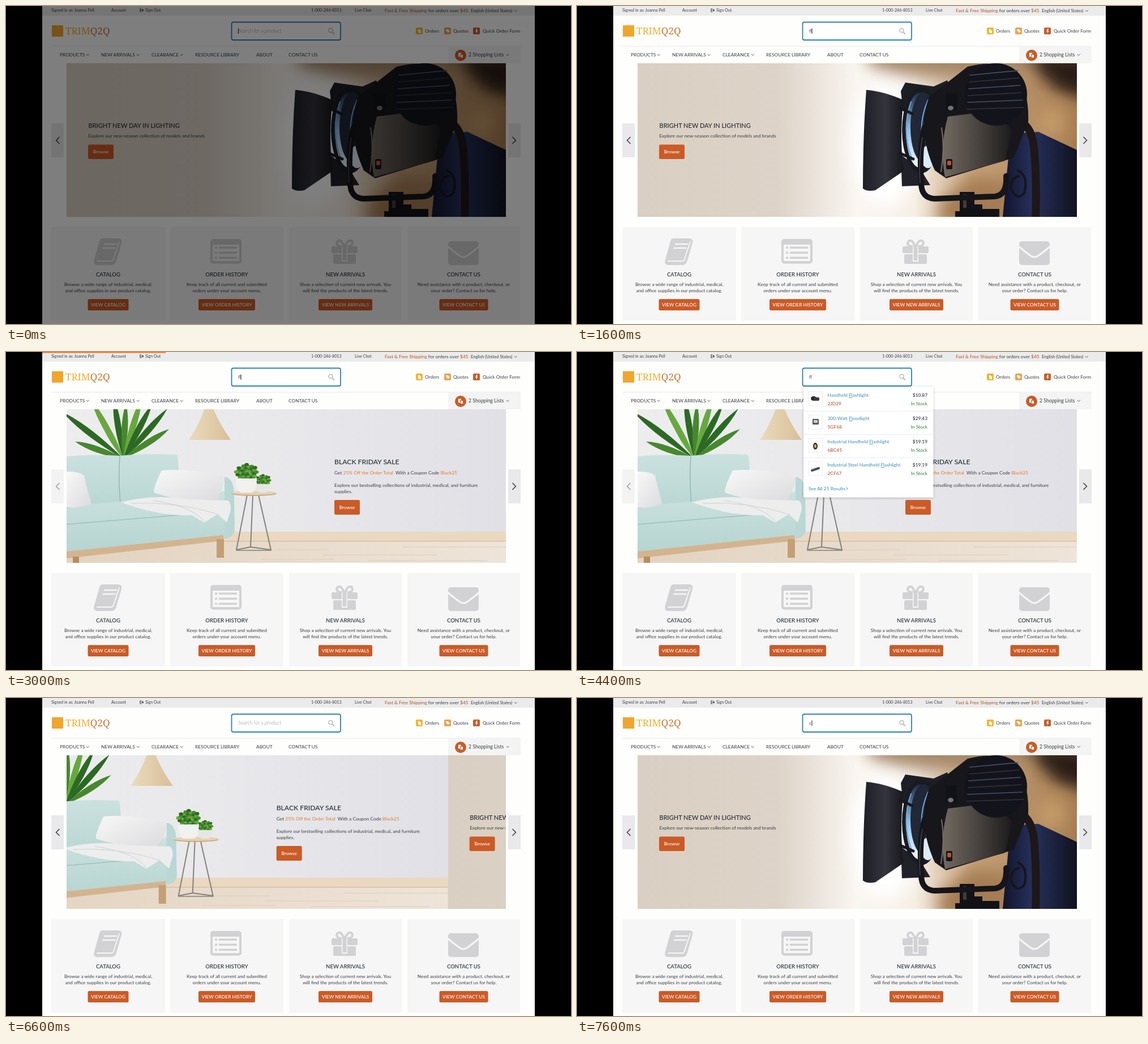
Recreate the animation shown at these times as an HTML page. Size 998x561 px, loop 8000 ms.

```html
<!DOCTYPE html>
<html lang="en">
<head>
<meta charset="utf-8">
<title>Shop search</title>
<style>
html, body { margin: 0; width: 100%; height: 100%; overflow: hidden; background: #000; }
svg { display: block; width: 998px; height: 561px; font: 8.36px Lato, sans-serif; fill: #393d41; }
text { white-space: pre; }
.line { fill: none; stroke-linecap: round; stroke-linejoin: round; }
</style>
</head>
<body>
<svg id="stage" viewBox="0 0 998 561" xmlns="http://www.w3.org/2000/svg"></svg>
<script>
const ORANGE = '#cb5b27', DARK = '#252c35', ICON = '#d2d2d4', PANEL = '#f6f6f6';
const SLIDE_WIDTH = 776, LOOP = 8000, STEP = 200;

const rect = (x, y, w, h, fill, r = 0) =>
  `<rect x="${x}" y="${y}" width="${w}" height="${h}" rx="${r}" fill="${fill}"/>`;
const shape = (d, fill) => `<path d="${d}" fill="${fill}"/>`;
const line = (d, color, w = 1) => `<path class="line" d="${d}" stroke="${color}" stroke-width="${w}"/>`;
const oval = (x, y, rx, ry, fill) => `<ellipse cx="${x}" cy="${y}" rx="${rx}" ry="${ry}" fill="${fill}"/>`;
const text = (x, y, str, { size = 8.36, fill = '#393d41', anchor = 'start', weight = 400 } = {}) =>
  `<text x="${x}" y="${y}" font-size="${size}" fill="${fill}" text-anchor="${anchor}" font-weight="${weight}">${str}</text>`;
const chevron = (x, y) => line(`M${x} ${y}l2.2 2.2 2.2-2.2`, '#555');
const button = (x, y, w, h, label) => rect(x, y, w, h, ORANGE, 2.5) +
  text(x + w / 2, y + h / 2 + 3, label, { fill: '#fff', anchor: 'middle', weight: 500 });
const gradient = (id, stops, dir = 'x2="1" y2="0"') =>
  `<linearGradient id="${id}" x1="0" y1="0" ${dir}>` +
  stops.map(([at, c]) => `<stop offset="${at}" stop-color="${c}"/>`).join('') + '</linearGradient>';

const GREENS = ['#2c6a24', '#47882e', '#67a83f'];
function leaf(x, y, tx, ty, w, fill) {
  const dx = tx - x, dy = ty - y, n = Math.hypot(dx, dy);
  const mx = x + dx * .6, my = y + dy * .6, ox = -dy / n * w, oy = dx / n * w;
  return shape(`M${x} ${y}Q${mx + ox} ${my + oy} ${tx} ${ty}Q${mx - ox} ${my - oy} ${x} ${y}`, fill);
}
const plant = (x, y, tips, w) => tips.map(([tx, ty], i) => leaf(x, y, tx, ty, w, GREENS[i % 3])).join('');

// leaves spread over a disc by the golden angle
function shrub(x, y, r) {
  let out = '';
  for (let i = 0; i < 40; i++) {
    const a = i * 2.4, d = r * Math.sqrt(i / 40);
    out += oval(x + Math.cos(a) * d, y + Math.sin(a) * d * .8, r * .2, r * .15, GREENS[i % 3]);
  }
  return out;
}

const defs = `<defs>
  ${gradient('wall', [[0, '#ededee'], [.45, '#e9e9ec'], [1, '#e0e0e6']])}
  ${gradient('floor', [[0, '#e3d3c0'], [1, '#eee4d9']])}
  ${gradient('shade', [[0, '#eadbbd'], [1, '#d8bf97']])}
  ${gradient('sofa', [[0, '#cbe2df'], [1, '#b4d3d0']], 'x2="0" y2="1"')}
  ${gradient('pillow', [[0, '#f8f8f8'], [1, '#dbdbde']], 'x2="1" y2="1"')}
  ${gradient('studio', [[0, '#d9cfc2'], [.32, '#ddd3c8'], [.5, '#faf6f1'], [.63, '#f6efe5'], [.76, '#c7a47c'], [1, '#a67c50']])}
  ${gradient('navy', [[0, '#11142a'], [.4, '#26305c'], [1, '#10121f']])}
  ${gradient('metal', [[0, '#726a62'], [.55, '#45403c'], [1, '#1c1a1b']])}
  ${gradient('door', [[0, '#1e1f25'], [.55, '#33343c'], [1, '#17181d']])}
  ${gradient('glass', [[0, '#1f3049'], [.5, '#8fbfe8'], [1, '#f4faff']], 'x2="0" y2="1"')}
  <clipPath id="window"><rect x="107" y="101" width="776" height="271"/></clipPath>
  <filter id="soft"><feGaussianBlur stdDeviation="14"/></filter>
  <filter id="shadow"><feDropShadow dx="0" dy="1" stdDeviation="2" flood-opacity=".25"/></filter>
</defs>`;

const topBar = rect(64, 0, 870, 17, '#ebebeb') +
  [[80, 'Signed in as: Joanna Pell'], [186, 'Account'], [246, 'Sign Out'], [539, '1-000-246-8013'], [616, 'Live Chat']]
    .map(([x, s]) => text(x, 10.3, s, { size: 7.17 })).join('') +
  line('M239 5h-2v5h2M239 7.5h3.5m-1.5-1.5l1.5 1.5-1.5 1.5', '#444', 1.2) +
  text(669, 10.7, `<tspan fill="#b5501f">Fast &amp; Free Shipping</tspan> for orders over <tspan fill="#b5501f">$45</tspan>`) +
  text(821, 11, 'English (United States)', { size: 7.5 }) + chevron(898, 7.5);

const header = rect(81, 34, 20, 20, '#f2a52b') +
  `<text x="105" y="50" font-size="17" font-family="Noto Serif, serif" fill="#f2ae2e">TRIM<tspan fill="#cf6d2b">Q2Q</tspan></text>` +
  `<rect x="398.5" y="28.5" width="192.5" height="31.5" rx="3" fill="#fff" stroke="#2c82b8" stroke-width="1.8"/>` +
  `<circle cx="573.5" cy="43" r="3.6" fill="none" stroke="#b9b9bb" stroke-width="1.5"/>` + line('M576.3 46l3 3', '#b9b9bb', 1.9) +
  `<text id="query" x="410" y="47.3"/>` + `<rect id="caret" y="39.5" width="1" height="9.5" fill="#222"/>` +
  rect(724, 38, 12, 12, '#f3b62f', 2) + rect(728, 41, 3, 6, '#fff') + rect(730, 43, 3, 5, '#fff') +
  rect(774, 38, 12, 12, '#f0a04b', 2) + shape('M777 41h3.5l3.5 3.5-3 3-4-4z', '#fff') +
  rect(825, 38, 12, 12, ORANGE, 2) + shape('M831 40l-2 5h2l-.5 4 3-5.5h-2l1.5-3.5z', '#fff') +
  [[740, 'Orders'], [790, 'Quotes'], [842, 'Quick Order Form']].map(([x, s]) => text(x, 47.3, s)).join('') +
  rect(80, 70.5, 829, 1, '#e9e9e9') + rect(781, 72, 128, 29, '#f4f4f4') +
  [[95, 'PRODUCTS'], [168, 'NEW ARRIVALS'], [257, 'CLEARANCE'], [334, 'RESOURCE LIBRARY'], [442, 'ABOUT'], [499, 'CONTACT US']]
    .map(([x, s]) => text(x, 89, s)).join('') +
  [142, 231, 308, 884].map(x => chevron(x, 85.2)).join('') +
  oval(803, 87, 10, 10, ORANGE) + rect(799, 82.5, 5, 7, '#fff', 1) + rect(802, 85, 5.5, 6.5, ORANGE) + rect(803, 86, 4, 5, '#fff', .5) +
  text(817, 89.3, '2 Shopping Lists', { size: 8.7 });

const livingRoom = rect(107, 101, 776, 271, 'url(#wall)') +
  rect(107, 334, 776, 38, 'url(#floor)') + rect(107, 317, 776, 17, '#ead8c0') + rect(107, 333, 776, 1.5, '#d3bfa5') +
  [[420, 349, 150], [560, 358, 200], [700, 344, 183], [450, 366, 130], [640, 368, 210]]
    .map(([x, y, w]) => line(`M${x} ${y}h${w}`, '#dfccb5')).join('') +
  plant(207, 188, [[100, 106], [122, 158], [150, 84], [190, 80], [212, 90], [240, 80], [285, 100], [288, 136], [165, 112], [258, 92]], 11) +
  shape('M351 100h15q12 28 31 55h-74q18-27 28-55z', 'url(#shade)') +
  // sofa
  shape('M107 184Q150 180 200 183Q250 178 301 181Q306 183 305 240V300H107z', 'url(#sofa)') +
  line('M201 184q-3 40 1 82', '#91b7b6', 1.5) +
  shape('M107 276Q200 256 302 268L388 245Q400 246 402 262L404 312Q404 326 386 330L107 364z', 'url(#sofa)') +
  shape('M386 220Q402 222 403 250L404 314Q402 326 386 328z', '#b9d7d5') +
  line('M107 304Q230 294 386 281', '#9cc0bf', 1.5) +
  shape('M107 352L384 323V333L107 364z', '#d3b48f') +
  rect(372, 330, 13, 33, '#c49f75') + rect(118, 361, 11, 11, '#b78d60') +
  shape('M107 211Q128 210 138 218Q143 242 151 268Q130 276 107 274z', 'url(#pillow)') +
  shape('M275 209Q325 205 383 219Q391 226 371 262Q330 269 263 249Q256 247 275 209z', 'url(#pillow)') +
  shape('M203 265Q260 250 320 260L392 262Q399 268 396 282L390 301L374 286L350 301L328 288Q270 290 203 265z', '#ededee') +
  line('M222 267Q300 263 374 286M260 262Q330 272 350 299', '#cfd0d3') +
  // side table
  line('M426 252L407 349L432 344L468 349L446 252M436 252L432 344', '#85817d', 2) + line('M407 350h61', '#85817d', 1.5) +
  oval(438, 250, 40, 4, '#c9ab84') + oval(438, 248.5, 40, 3.5, '#e6d2b3') +
  shrub(425, 213, 19) + shrub(454, 227, 13) +
  shape('M406 223h37q0 24-10 25h-18q-9-3-9-25z', '#f1f1f0') + shape('M441 233h25q0 14-7 15h-11q-7-2-7-15z', '#e6e6e5') +
  text(580, 198.3, 'BLACK FRIDAY SALE', { size: 12.2, fill: DARK, weight: 500 }) +
  text(580, 216.3, `Get <tspan fill="#e07a2c">25% Off the Order Total</tspan>  With a Coupon Code <tspan fill="#e07a2c">Black25</tspan>`, { size: 8.4 }) +
  text(580, 237.5, 'Explore our bestselling collections of industrial, medical, and furniture') +
  text(580, 248.5, 'supplies.') + button(580, 261, 45, 26, 'Browse');

const slats = [0, 1, 2, 3, 4, 5].map(i =>
  line(`M${694 - i} ${122 + i * 12}L${779 + i * 2} ${114 + i * 13}`, i % 2 ? '#30333e' : '#46506a', 1.6)).join('');
const backdrop = rect(107, 101, 776, 271, 'url(#studio)') + `<g filter="url(#soft)">` +
  oval(660, 92, 150, 34, '#a58869') + oval(545, 245, 60, 110, '#fff') +
  shape('M785 85H910V165L850 150z', '#2c1f18') + shape('M640 345L700 300L770 310V390H640z', '#a57c53') +
  oval(838, 205, 26, 28, '#c39a69') + '</g>' +
  shape('M766 225L815 222L883 254V372H752z', 'url(#navy)');
const studio = backdrop +
  // stand, cable and rear arm
  shape('M676 328h26v22h14v8h30v14h-78v-10h8z', '#121216') + rect(682, 332, 6, 24, '#3f3c3c') +
  line('M779 290Q798 300 790 330Q776 346 766 320Q768 302 781 300', '#15151b', 4) +
  line('M784 205Q806 215 808 260Q812 310 810 380', '#1d1718', 14) +
  // lamp head
  shape('M572 150L580 135L630 142L654 131L661 150L622 176L576 186z', '#1d1e25') +
  shape('M572 262L608 290L624 316L574 318z', '#202129') +
  oval(608, 219, 34, 76, '#191b22') + oval(605, 219, 24, 66, 'url(#glass)') + oval(612, 214, 23, 62, '#202736') +
  line('M590 169Q572 220 592 270M620 166Q596 220 622 276', '#6ba7df', 2) + oval(620, 266, 12, 20, '#dcebf8') +
  shape('M622 160L690 107Q738 94 775 114Q799 150 797 205L771 268L652 304L632 290Q600 220 622 160z', '#17161b') +
  shape('M655 195L735 185L768 218L756 273L650 302Q640 250 655 195z', 'url(#metal)') +
  oval(740, 156, 55, 55, '#13141b') + slats +
  rect(651, 154, 20, 30, '#111217', 3) + oval(660, 180, 5, 4, '#70727a') +
  rect(652, 270, 11, 18, '#151417', 2) + rect(654, 273, 7, 8, '#c0532a', 2) +
  line('M644 215Q650 250 643 292', '#766f68', 2) +
  shape('M511 148Q540 150 577 166Q569 230 577 291L527 325Q512 328 505 322Q505 230 511 148z', 'url(#door)') +
  line('M571 180L592 190M571 260L594 270', '#17181d', 5) +
  // front yoke
  line('M614 214Q604 250 608 312Q608 339 632 340L738 336Q760 334 758 300', '#15151a', 10) +
  line('M610 232Q603 270 606 312', '#45434a', 1.5) +
  text(145.5, 214.8, 'BRIGHT NEW DAY IN LIGHTING', { size: 11, fill: DARK, weight: 500 }) +
  text(145.5, 232.3, 'Explore our new-season collection of models and brands') + button(145, 244.5, 45, 25.5, 'Browse');

const carousel = `<g clip-path="url(#window)"><g id="room">${livingRoom}</g><g id="studio-slide">${studio}</g></g>` +
  `<g id="prev">${rect(80, 207, 22, 60, '#e9e9ec')}${line('M94 231.5l-5.5 5.5 5.5 5.5', '#444', 1.7)}</g>` +
  rect(887, 207, 22, 60, '#e9e9ec') + line('M895 231.5l5.5 5.5-5.5 5.5', '#444', 1.7);

const book = shape('M170 410H199Q206 411 204 418L195 449Q193 457 186 457H160Q153 455 156 447L165 415Q167 410 170 410z', ICON) +
  line('M174 420h21M171.5 427h21', PANEL, 2.5) + line('M161 450h25q3 0 4-4l10-30', PANEL, 2);
const list = rect(361, 411, 55, 43.5, ICON, 5) + rect(365, 421, 47, 29, PANEL, 1) +
  [426, 435, 444].map(y => rect(369, y - 1.5, 4, 3.5, ICON) + rect(376, y - 1.5, 32, 3.5, ICON)).join('');
const gift = rect(575, 424, 46, 12, ICON, 2) + rect(578, 438, 40, 17, ICON, 2) +
  line('M597 424Q585 425 584 419Q586 411 592 415L598 424L604 415Q611 411 612 419Q611 425 599 424', ICON, 4) +
  rect(593, 424, 10, 27, PANEL) + rect(594.5, 424, 7, 25, ICON);
const mail = rect(781, 415, 54, 42, ICON, 5) + line('M780 424Q792 434 802 441Q808 445 814 441Q824 434 836 424', PANEL, 3);

const cards = [
  [80, 201, 'CATALOG', 'Browse a wide range of industrial, medical,', 'and office supplies in our product catalog.', 'VIEW CATALOG', 72, book],
  [290, 200, 'ORDER HISTORY', 'Keep track of all current and submitted', 'orders under your account menu.', 'VIEW ORDER HISTORY', 100, list],
  [500, 199, 'NEW ARRIVALS', 'Shop a selection of current new arrivals. You', 'will find the products of the latest trends.', 'VIEW NEW ARRIVALS', 95, gift],
  [709, 199, 'CONTACT US', 'Need assistance with a product, checkout, or', 'your order? Contact us for help.', 'VIEW CONTACT US', 86, mail],
].map(([x, w, title, a, b, label, bw, icon]) => {
  const mid = x + w / 2, anchor = 'middle';
  return rect(x, 390, w, 165, PANEL) + icon +
    text(mid, 476.5, title, { size: 9.6, fill: DARK, anchor, weight: 500 }) +
    text(mid, 493.5, a, { anchor }) + text(mid, 505, b, { anchor }) +
    button(mid - bw / 2, 517, bw, 20, label);
}).join('');

const thumbs = [
  oval(418, 82, 5, 4, '#26282b') + rect(418, 80, 10, 6, '#3a3c40', 2),
  rect(416, 118, 11, 10, '#55595a', 1) + rect(418, 120, 7, 5, '#c9cfc8'),
  oval(421, 166, 4, 6, '#33322f') + oval(421, 166, 2, 3, '#e0b437'),
  line('M415 209l12-4', '#4c4e52', 4),
];
const results = [
  ['Handheld ', 'ashlight', '2JD29', '$10.87'],
  ['300-Watt ', 'oodlight', '5GF68', '$29.43'],
  ['Industrial Handheld ', 'ashlight', '6BC45', '$19.19'],
  ['Industrial Steel Handheld ', 'ashlight', '2CF67', '$19.19'],
].map(([before, after, sku, price], i) => {
  const y = 79 + i * 41.1;
  return `<rect x="409.5" y="${y - 9}" width="24" height="25" fill="#fff" stroke="#ececec"/>` + thumbs[i] +
    text(442.5, y, `${before}<tspan text-decoration="underline">Fl</tspan>${after}`, { fill: '#3a8cb4' }) +
    text(442.5, y + 14.5, sku, { fill: '#ad4420' }) +
    text(619, y, price, { fill: DARK, anchor: 'end', weight: 500 }) +
    text(619, y + 14.5, 'In Stock', { fill: '#2f7d32', anchor: 'end' }) +
    (i < 3 ? rect(400, y + 25, 229, 1, '#ececec') : '');
}).join('');
const dropdown = `<g id="dropdown"><g filter="url(#shadow)">${rect(400, 61, 229.5, 195.5, '#fff')}</g>${results}` +
  text(409, 244, 'See All 25 Results', { fill: '#3a8cb4' }) + line('M476 238.8l2 2.2-2 2.2', '#3a8cb4') + '</g>';

const stage = document.getElementById('stage');
stage.innerHTML = defs + rect(0, 0, 998, 561, '#000') + rect(64, 0, 870, 561, '#fefefd') +
  topBar + header + carousel + cards + dropdown +
  '<rect id="bar" x="64" y="0" height="2" fill="#ee8a45"/><rect id="dim" width="998" height="561" fill="#000"/>';

const $ = id => document.getElementById(id);
const set = (id, attrs) => Object.entries(attrs).forEach(([k, v]) => $(id).setAttribute(k, v));
const clamp = v => Math.min(1, Math.max(0, v));

// cubic-bezier(.25, .1, .25, 1)
function ease(x) {
  let lo = 0, hi = 1;
  const curve = (s, a, b) => 3 * (1 - s) ** 2 * s * a + 3 * (1 - s) * s * s * b + s ** 3;
  for (let i = 0; i < 24; i++) {
    const mid = (lo + hi) / 2;
    if (curve(mid, .25, .25) < x) lo = mid; else hi = mid;
  }
  return curve(lo, .1, 1);
}
const progress = (t, start) => ease(clamp((t - start) / 900));

function draw(t) {
  const shift = SLIDE_WIDTH * (1 - progress(t, 2000) + progress(t, 6490));
  set('room', { transform: `translate(${-shift})` });
  set('studio-slide', { transform: `translate(${SLIDE_WIDTH - shift})` });
  set('prev', { opacity: t > 2000 && t < 6490 ? .5 : 1 });

  const query = t < 1600 ? '' : t < 6400 ? 'fl' : t < 7400 ? '' : 'c';
  $('query').textContent = query || 'Search for a product';
  set('query', { fill: query ? '#444' : '#bcbcbe', 'font-size': query ? 8.36 : 8.6 });
  const caretOn = t < 2000 || t >= 7600 || (t < 7400 && (t - 900) % 1000 < 500);
  set('caret', { x: query ? 414.5 : 410, opacity: +caretOn });

  const loading = t >= 2600 && t < 4400;
  set('bar', { width: loading ? Math.min(870, Math.max(20, 218 + (t - 3000) * .775)) : 0, opacity: t < 4200 ? 1 : .5 });
  set('dropdown', { visibility: t >= 4200 && t < 6400 ? 'visible' : 'hidden' });
  set('dim', { opacity: .5 * clamp(1 - t / 400) });
}

function tick() {
  const t = performance.now() % LOOP;
  draw(Math.floor(t / STEP) * STEP);
  requestAnimationFrame(tick);
}
tick();
</script>
</body>
</html>
```
